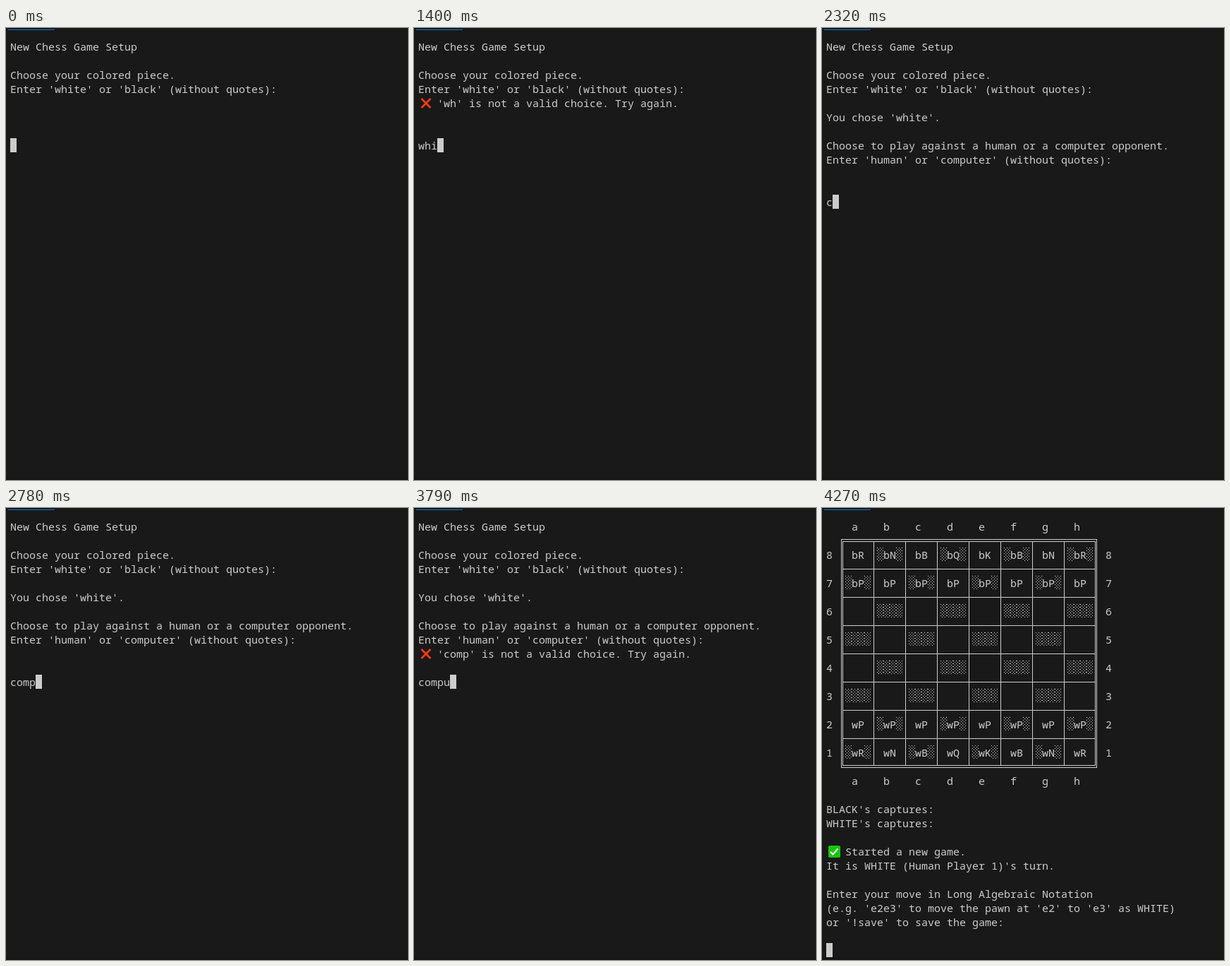
Recreate the animation shown at these times as an HTML page with a canvas. Size 570 by 640 pixels, loop 8000 ms.

```html
<!DOCTYPE html>
<html lang="en">
<head>
<meta charset="utf-8">
<title>Chess game setup</title>
<style>
html, body { margin: 0; width: 570px; height: 640px; overflow: hidden; background: #191919; }
canvas { display: block; }
</style>
</head>
<body>
<canvas width="570" height="640"></canvas>
<script>
const LOOP = 8000, CELL_W = 9, CELL_H = 20, LEFT = 6, TOP = 16;
const BG = '#191919', FG = '#cccccc';
const ctx = document.querySelector('canvas').getContext('2d');

const x = col => LEFT + col * CELL_W;
const y = row => TOP + row * CELL_H;

function rect(left, top, width, height, color = FG) {
  ctx.fillStyle = color;
  ctx.fillRect(left, top, width, height);
}

function print(row, text, col = 0) {
  ctx.fillStyle = FG;
  ctx.fillText(text, x(col), y(row) + 16);
}

function cursor(row, col = 0) {
  rect(x(col), y(row), CELL_W, CELL_H);
}

function stroke(points, color, width) {
  ctx.strokeStyle = color;
  ctx.lineWidth = width;
  ctx.beginPath();
  points.forEach(([px, py], i) => i % points.length ? ctx.lineTo(px, py) : ctx.moveTo(px, py));
  ctx.stroke();
}

function cross(row) {
  const t = y(row);
  stroke([[10.5, t + 4], [23.5, t + 17]], '#f03a17', 2.8);
  stroke([[23.5, t + 4], [10.5, t + 17]], '#f03a17', 2.8);
}

function check(row) {
  const t = y(row);
  ctx.fillStyle = '#16c60c';
  ctx.beginPath();
  ctx.roundRect(9, t + 2, 17, 17, 2);
  ctx.fill();
  stroke([[12, t + 11], [15.5, t + 14.5], [22.5, t + 6.5]], '#ffffff', 2.2);
}

function shade(row, col) {
  for (let dy = 0; dy < CELL_H; dy += 2)
    for (let dx = dy % 4; dx < CELL_W; dx += 4)
      rect(x(col) + dx, y(row) + dy, 1, 1);
}

function error(row, word) {
  cross(row);
  print(row, `'${word}' is not a valid choice. Try again.`, 3);
}

function colorPrompt() {
  print(0, 'New Chess Game Setup');
  print(2, 'Choose your colored piece.');
  print(3, "Enter 'white' or 'black' (without quotes):");
}

function opponentPrompt() {
  colorPrompt();
  print(5, "You chose 'white'.");
  print(7, 'Choose to play against a human or a computer opponent.');
  print(8, "Enter 'human' or 'computer' (without quotes):");
}

function grid() {
  for (const [left, top, width, height] of [[27, 44, 363, 324], [29, 47, 359, 318]]) {
    rect(left, top, width, height);
    rect(left + 1, top + 1, width - 2, height - 2, BG);
  }
  for (let i = 1; i < 8; i++) {
    rect(28 + 45 * i, 47, 1, 318);
    rect(29, 46 + 40 * i, 359, 1);
  }
}

function board() {
  grid();
  const back = 'RNBQKBNR', pawns = 'PPPPPPPP';
  const ranks = { 0: ['b', back], 1: ['b', pawns], 6: ['w', pawns], 7: ['w', back] };
  for (let r = 0; r < 8; r++) {
    const row = 2 + 2 * r;
    print(row, `${8 - r}`);
    print(row, `${8 - r}`, 44);
    for (let c = 0; c < 8; c++) {
      const col = 3 + 5 * c;
      if ((r + c) % 2)
        for (const k of ranks[r] ? [0, 3] : [0, 1, 2, 3]) shade(row, col + k);
      if (ranks[r]) print(row, ranks[r][0] + ranks[r][1][c], col + 1);
    }
  }
  [...'abcdefgh'].forEach((file, c) => {
    print(0, file, 4 + 5 * c);
    print(18, file, 4 + 5 * c);
  });
}

function game() {
  board();
  print(20, "BLACK's captures:");
  print(21, "WHITE's captures:");
  check(23);
  print(23, 'Started a new game.', 3);
  print(24, "It is WHITE (Human Player 1)'s turn.");
  print(26, 'Enter your move in Long Algebraic Notation');
  print(27, "(e.g. 'e2e3' to move the pawn at 'e2' to 'e3' as WHITE)");
  print(28, "or '!save' to save the game:");
  cursor(30);
}

// Typed input: each entry is [time, characters visible from then on].
function typed(t, row, word, steps) {
  let count = 0;
  for (const [at, n] of steps) if (t >= at) count = n;
  print(row, word.slice(0, count));
  return count;
}

function draw(t) {
  rect(0, 0, 570, 640, BG);
  rect(0, 636, 570, 4, '#161616');
  rect(3, 2, 66, 1, '#0078d4');
  ctx.font = '15px "Noto Sans Mono", monospace';

  if (t >= 4270) return game();
  if (t >= 1760) {
    opponentPrompt();
    if (t >= 3060) error(9, 'comp');
    const steps = t < 3060
      ? [[2320, 1], [2410, 2], [2500, 3], [2780, 4]]
      : [[3430, 2], [3520, 4], [3790, 5], [3860, 6], [4030, 7], [4100, 8]];
    return cursor(11, typed(t, 11, 'computer', steps));
  }
  colorPrompt();
  if (t >= 940) error(4, 'wh');
  const steps = t < 940 ? [[500, 1], [570, 2]] : [[1310, 1], [1400, 3], [1580, 5]];
  const count = typed(t, 7, 'white', steps);
  if (t >= 850 && t < 940) cursor(8);
  else cursor(7, count);
}

const start = performance.now();
function frame() {
  draw((performance.now() - start) % LOOP);
  requestAnimationFrame(frame);
}
frame();
</script>
</body>
</html>
```
